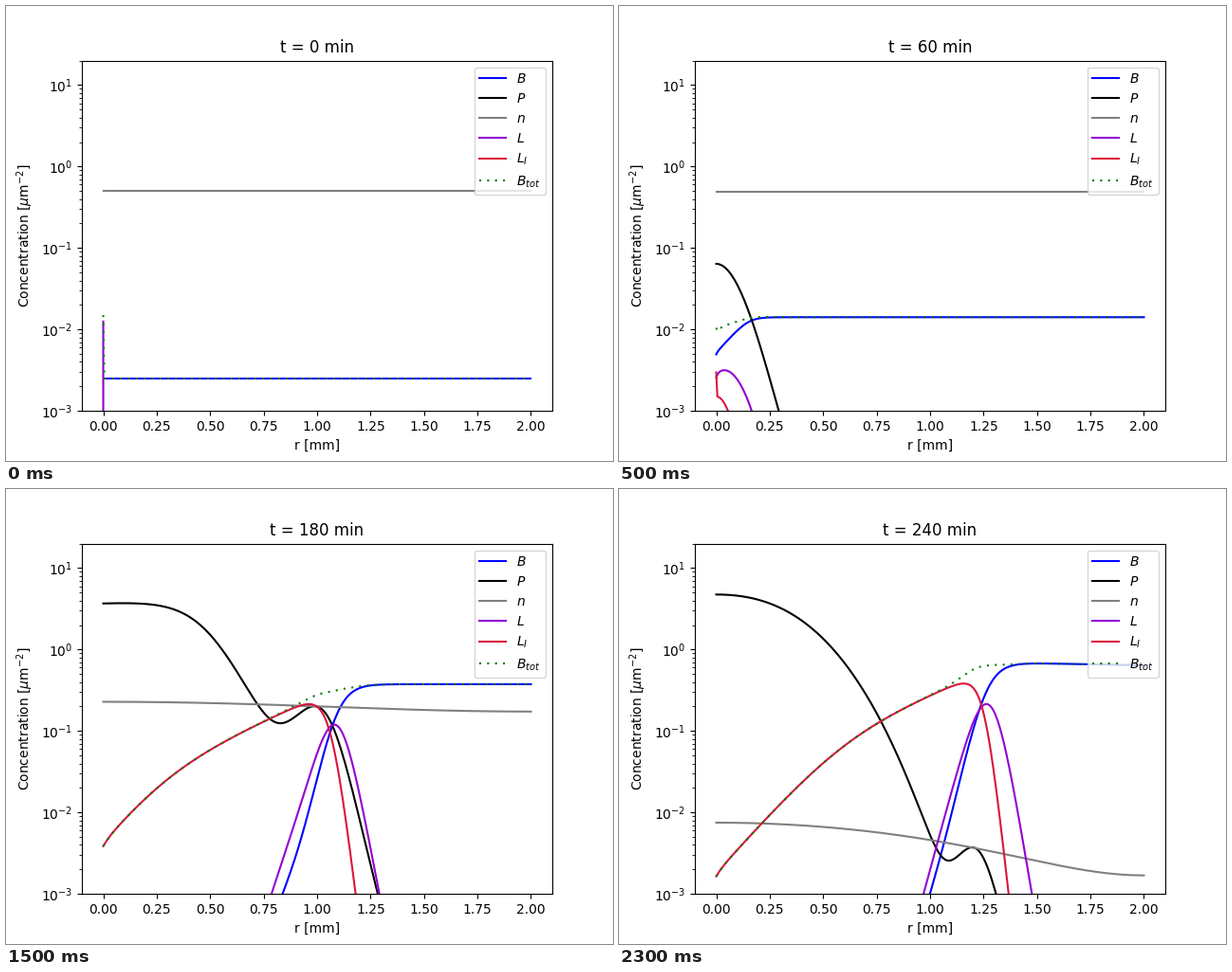
A matplotlib script that plays this animation: 640x480 px, repeating every 2500 ms.

```python
import numpy as np
import matplotlib.pyplot as plt
from matplotlib.animation import FuncAnimation

plt.rcParams["text.kerning_factor"] = 6

r = np.linspace(0, 2, 401)
ZERO = np.zeros_like(r)
EDGE = (0, -3, 0.02)  # quick rise next to the centre


def bent(x0, y0, slope, *bends):
    """Line on the log scale whose slope changes smoothly.

    Each bend is (position, change of slope, width).
    """
    lg = y0 + slope * (r - x0)
    for pos, change, width in bends:
        lg = lg + change * width * np.logaddexp(0, (r - pos) / width)
    return 10 ** lg


def nutrient(left, right):
    return (left + right) / 2 + (left - right) / 2 * np.cos(np.pi * r / 2)


# Every state returns B, P, n, L and L_I along r.

def inoculation():
    drop = np.where(r == 0, 0.0125, 0)
    return ZERO + 0.0025, ZERO, ZERO + 0.5, drop, ZERO


def first_infections():
    b = bent(0, -2.284, 8.9, (0, -6, 0.005), (0.15, -2.9, 0.03))
    p = 10 ** (-1.194 - 27.6 * r ** 2 / (1 + 3.59 * r ** 2))
    l = 10 ** (-2.54 + 2.2 * r - 30 * r ** 2 - 0.05 * np.exp(-r / 0.008))
    li = 10 ** (-2.822 - 59 * r ** 2 + 0.295 * np.exp(-r / 0.001))
    return b, p, ZERO + 0.49, l, li


def front_forms():
    b = bent(0.5485, -1.107, 11.38, (0.5485, -11.38, 0.045))
    p = (0.212 * np.exp(-(r / 0.143) ** 2)
         + bent(0, -0.8, 0.44, (0.556, -11.64, 0.045)))
    l = bent(0.337, -2.94, 10.2, (0.548, -22, 0.055))
    li = bent(0, -1.984, 4.62, EDGE, (0.542, -21.6, 0.048))
    return b, p, nutrient(0.432, 0.424), l, li


def front_spreads():
    b = bent(0.845, -2.9775, 6.5, (0.93, 6, 0.04), (1.09, -12.5, 0.045))
    p = (bent(0, 0.571, 0.12, (0.48, -5.55, 0.102))
         + bent(0.787, -1.296, 4, (1.045, -15.8, 0.05)))
    l = bent(0.787, -3, 8, (0.93, 1.4, 0.03), (1.096, -23.2, 0.04))
    li = bent(0, -2.305, 6.38, EDGE, (0.25, -2.2, 0.16),
              (1.065, -22.6, 0.036))
    return b, p, nutrient(0.2286, 0.1734), l, li


def nutrient_runs_out():
    b = bent(1, -2.998, 9, (1.07, 2.4, 0.03), (1.264, -11.45, 0.045))
    p = (10 ** (0.676 - 1.33 * r ** 2 - 1.68 * r ** 3)
         + bent(1.05, -2.942, 5, (1.232, -16.5, 0.04)))
    l = bent(0.969, -3, 9.65, (1.284, -25.4, 0.042))
    li = bent(0, -2.735, 5.95, EDGE, (0.59, -1.85, 0.16),
              (1.254, -25, 0.032))
    return b, p, nutrient(0.0075, 0.00169), l, li


states = [inoculation(), first_infections(), front_forms(),
          front_spreads(), nutrient_runs_out()]

fig, ax = plt.subplots(figsize=(6.4, 4.8), dpi=100)
styles = [("$B$", "b", "-"), ("$P$", "k", "-"), ("$n$", "gray", "-"),
          ("$L$", "darkviolet", "-"), ("$L_I$", "crimson", "-"),
          ("$B_{tot}$", "g", (0, (1, 3)))]
lines = [ax.plot([], [], ls=ls, color=color, label=label)[0]
         for label, color, ls in styles]
ax.set_yscale("log")
ax.set_xlim(-0.1, 2.1)
ax.set_ylim(1e-3, 20)
ax.set_xlabel("r [mm]")
ax.set_ylabel(r"Concentration [$\mu$m$^{-2}$]")
ax.legend(loc="upper right")
title = ax.set_title("")


def update(i):
    b, p, n, l, li = states[i]
    for line, y in zip(lines, (b, p, n, l, li, b + l + li)):
        line.set_data(r, y)
    title.set_text(f"t = {60 * i} min")
    return [*lines, title]


anim = FuncAnimation(fig, update, frames=len(states), interval=500,
                     repeat=True, blit=False)
plt.show()
```
